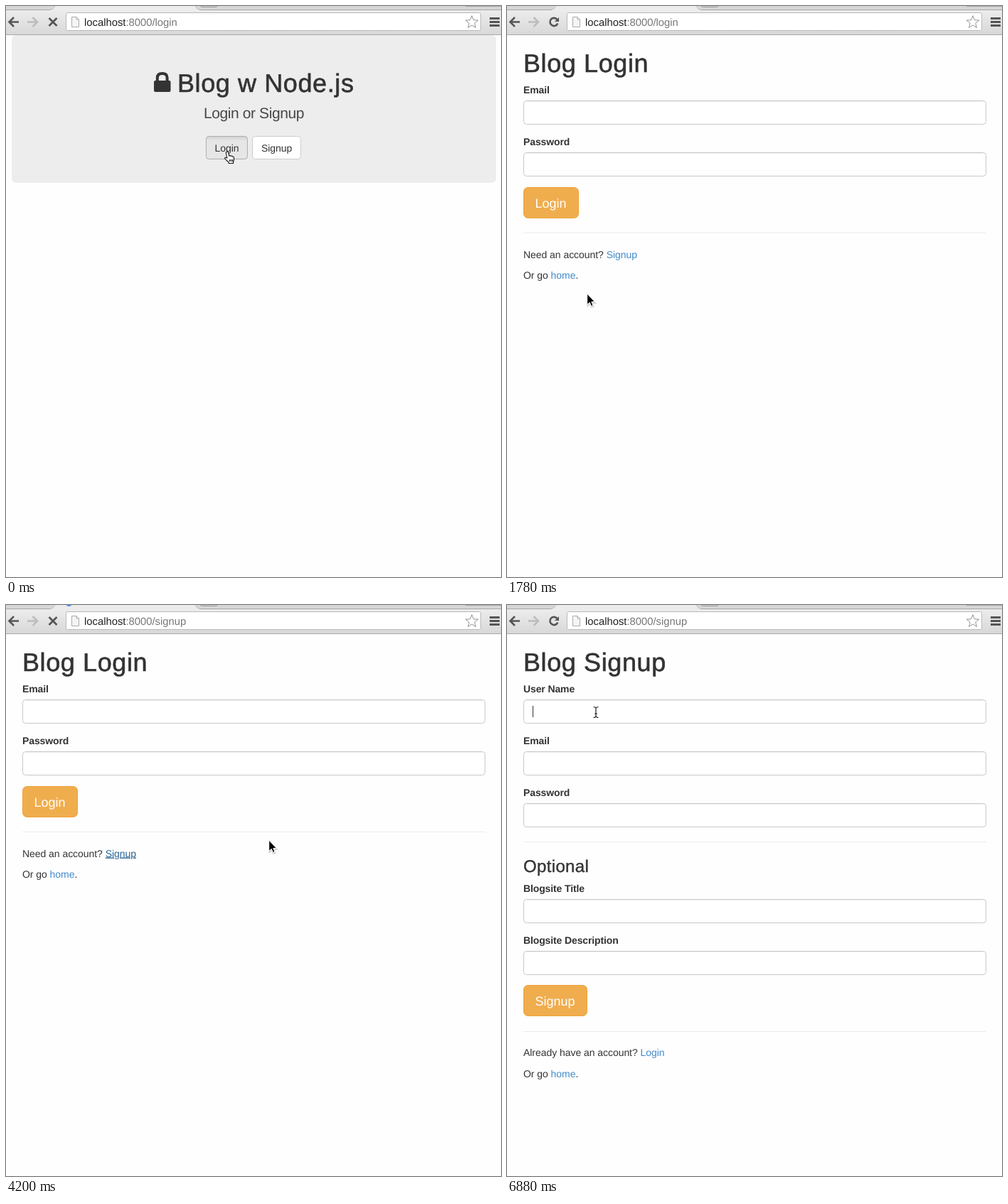
Animation, 696 px wide and 804 px high, one loop 8000 ms. Source, as an HTML page:

```html
<!DOCTYPE html>
<html lang="en">
<head>
<meta charset="utf-8">
<title>Blog login</title>
<style>
html, body { margin: 0; width: 100%; height: 100%; overflow: hidden; background: #fefefe; }
svg { display: block; }
text { font: 14px "Liberation Sans", Arial, sans-serif; fill: #333; letter-spacing: -.05px;
  text-rendering: geometricPrecision; white-space: pre; }
.h1 { font-size: 36px; letter-spacing: .6px; stroke: #333; stroke-width: .6px; }
.h3 { font-size: 24px; letter-spacing: .35px; stroke: #333; stroke-width: .4px; }
.lead { font-size: 21px; letter-spacing: -.4px; fill: #484848; }
.label { font-weight: bold; letter-spacing: -.12px; }
.big { font-size: 18px; letter-spacing: 0; fill: #fff; }
.url { font-size: 14.8px; letter-spacing: 0; fill: #222; }
.url tspan { fill: #777; }
.link { fill: #428bca; }
.hover .sign { fill: #2a6496; text-decoration: underline; }
.input { fill: #fff; stroke: #c8c8c8; }
.pale .input { stroke: #e9e9e9; }
.pale .inset { opacity: .2; }
.inset { stroke: #f0f0f0; }
.hr { stroke: #ececec; }
</style>
</head>
<body>
<svg width="696" height="804" viewBox="0 0 696 804">
  <defs>
    <linearGradient id="bar" x2="0" y2="1">
      <stop stop-color="#ededed"/><stop offset="1" stop-color="#d8d8d8"/>
    </linearGradient>
    <linearGradient id="press" x2="0" y2="1">
      <stop stop-color="#d2d2d2"/><stop offset=".2" stop-color="#e6e6e6"/>
    </linearGradient>
  </defs>
  <rect width="696" height="804" fill="#fefefe"/>

  <rect width="696" height="6" fill="#d6d6d6"/>
  <rect y="5" width="696" height="35" fill="url(#bar)"/>
  <path d="M0 5.5H62Q67 5 69 0H266Q268 5 273 5.5H696" fill="none" stroke="#a6a6a6"/>
  <path d="M69 0H266Q268 5 273 6H62Q67 5 69 0" fill="#ececec"/>
  <path d="M273 0Q274 1.5 277 1.5H294Q297 1.5 297 0M646 .5H696" fill="#c8c8c8" stroke="#a2a2a2"/>
  <path d="M0 40.5H696" stroke="#a9a9a9"/>
  <g fill="none" stroke-width="2.6">
    <path d="M18 22.5H5M11 16L4.5 22.5L11 29" stroke="#555"/>
    <path d="M30 22.5H43M37.500 16L44 22.500L37.500 29" stroke="#bdbdbd"/>
  </g>
  <rect x="84.500" y="9.500" width="583" height="25" rx="2" fill="#fff" stroke="#b9b9b9"/>
  <path d="M92.500 15.500H99L102.500 19V29.500H92.500ZM99 15.500V19H102.500" fill="#f5f5f5" stroke="#ababab"/>
  <text class="url" x="110" y="28">localhost<tspan id="path"></tspan></text>
  <path id="star" fill="#fff" stroke="#929292" stroke-linejoin="round"/>
  <path d="M680 17.500H694M680 22.500H694M680 27.500H694" stroke="#555" stroke-width="3"/>
  <g fill="none" stroke="#555" stroke-width="2.600">
    <path id="stop" d="M60.500 17L71.500 28M71.500 17L60.500 28"/>
    <g id="reload">
      <path d="M70.500 19A5.600 5.600 0 1 0 71.300 24.500"/>
      <path d="M73 16V22H67Z" fill="#555" stroke="none"/>
    </g>
  </g>
  <circle id="spin" cx="88.500" cy="-3" r="4" fill="none" stroke="#4a8eea" stroke-width="2"/>

  <g id="home">
    <rect x="8" y="41" width="681" height="208" rx="6" fill="#ededed"/>
    <rect x="208" y="105" width="23.500" height="16" rx="2" fill="#333"/>
    <path d="M212.800 106V101Q212.800 95 219.700 95T226.600 101V106" fill="none" stroke="#333" stroke-width="4"/>
    <text class="h1" x="241" y="121">Blog w Node.js</text>
    <text class="lead" x="278" y="158">Login or Signup</text>
    <rect x="281.500" y="183.500" width="58" height="32" rx="4" fill="url(#press)" stroke="#adadad"/>
    <rect x="346.500" y="183.500" width="68" height="32" rx="4" fill="#fff" stroke="#ccc"/>
    <text x="293.500" y="204.500">Login</text>
    <text x="359" y="204.500">Signup</text>
  </g>
  <g id="login"></g>
  <g id="signup"></g>
  <path id="caret" d="M36.500 142V158" stroke="#333"/>

  <g id="arrow" stroke="#fff" stroke-width="1">
    <path d="M0 0V14.500L3.300 11.400L5.500 16.500L8 15.400L5.800 10.500H10.300Z" transform="translate(.5 1.500)" fill="none" stroke="#000" stroke-opacity=".18" stroke-width="2"/>
    <path d="M-.3 -.8V14.500L3.300 11.400L5.500 16.500L8 15.400L5.800 10.500H10.500Z"/>
  </g>
  <path id="hand" d="M4.500 10.500L2.900 3Q2.600 1.300 4 1T6 2.300L7.300 7Q8.800 6 9.500 7.300Q11 6.500 11.600 8Q13.700 7.500 14 9.500V12Q14 14 13 15.200V17.500H6.600V16Q4 13.800 1.700 11.300Q.6 9.700 2 9.300T4.500 10.500M8 12V15M10 12V15M12 12V15" fill="#fff" stroke="#111" stroke-width="1.100"/>
  <g id="beam" fill="none">
    <path d="M-3.500 -7.500Q0 -7.500 0 -5V5Q0 7.500 -3.500 7.500M3.500 -7.500Q0 -7.500 0 -5V5Q0 7.500 3.500 7.500M-2 2H2" stroke="#222" stroke-width="1.200"/>
  </g>
</svg>
<script>
const $ = id => document.getElementById(id);
const text = (cls, x, y, s) => `<text class="${cls}" x="${x}" y="${y}">${s}</text>`;
const rule = y => `<path class="hr" d="M23 ${y}.5H674"/>`;
const field = (name, y) => text('label', 23, y, name) +
  `<rect class="input" x="23.5" y="${y + 10.5}" width="650" height="33" rx="4"/>
   <path class="inset" d="M26 ${y + 11.5}H671"/>`;
const button = (name, y, w) =>
  `<rect x="23.5" y="${y + .5}" width="${w}" height="43" rx="6" fill="#f0ad4e" stroke="#eea236"/>` +
  text('big', 39.5, y + 28.5, name);
const footer = (ask, link, y) =>
  text('', 23, y, `${ask} <tspan class="link sign">${link}</tspan>`) +
  text('', 23, y + 29.5, 'Or go <tspan class="link">home</tspan>.');

$('login').innerHTML = text('h1', 23, 93, 'Blog Login') +
  field('Email', 123) + field('Password', 196) +
  button('Login', 255, 77) + rule(319) +
  footer('Need an account?', 'Signup', 354.5);

$('signup').innerHTML = text('h1', 23, 93, 'Blog Signup') +
  field('User Name', 123) + field('Email', 196) + field('Password', 269) +
  rule(333) + text('h3', 23, 375.5, 'Optional') +
  field('Blogsite Title', 404) + field('Blogsite Description', 477) +
  button('Signup', 535, 89) + rule(600) +
  footer('Already have an account?', 'Login', 635);

let star = '';
for (let i = 0; i < 10; i++) {
  const r = i % 2 ? 4 : 9.3, a = i * Math.PI / 5;
  star += `${i ? 'L' : 'M'}${655 + r * Math.sin(a)} ${23 - r * Math.cos(a)}`;
}
$('star').setAttribute('d', star + 'Z');

// start time, page, address, cursor, x, y, flags
const steps = [
  [0, 'home', 'login', 'hand', 306.5, 204, 'stop'],
  [410, 'login', 'login', 'beam', 241.5, 225, ''],
  [1190, 'login', 'login', 'arrow', 130, 300, ''],
  [1780, 'login', 'login', 'arrow', 113, 406, ''],
  [2200, 'login', 'login', 'hand', 149.5, 356, ''],
  [2730, 'login', 'login', 'hand', 149.5, 356, 'hover'],
  [3210, 'login', 'signup', 'arrow', 230, 328, 'hover stop'],
  [4200, 'login', 'signup', 'arrow', 370, 332, 'hover stop spin'],
  [5440, 'signup', 'signup', 'arrow', 140, 196, 'pale'],
  [6070, 'signup', 'signup', 'beam', 125, 151, ''],
  [6880, 'signup', 'signup', 'beam', 125, 151, 'caret']
];
const show = (id, on) => $(id).style.display = on ? '' : 'none';

function draw(now) {
  const t = now % 8000;
  const [, page, url, cursor, x, y, flags] = steps.findLast(s => s[0] <= t);
  const has = f => flags.includes(f);
  for (const id of ['home', 'login', 'signup']) show(id, id === page);
  for (const id of ['arrow', 'hand', 'beam']) show(id, id === cursor);
  for (const id of ['stop', 'spin', 'caret']) show(id, has(id));
  show('reload', !has('stop'));
  $('path').textContent = ':8000/' + url;
  $('login').classList.toggle('hover', has('hover'));
  $('signup').classList.toggle('pale', has('pale'));
  $(cursor).setAttribute('transform', `translate(${x} ${y})`);
}

const start = performance.now();
function tick() {
  draw(performance.now() - start);
  requestAnimationFrame(tick);
}
tick();
</script>
</body>
</html>
```
